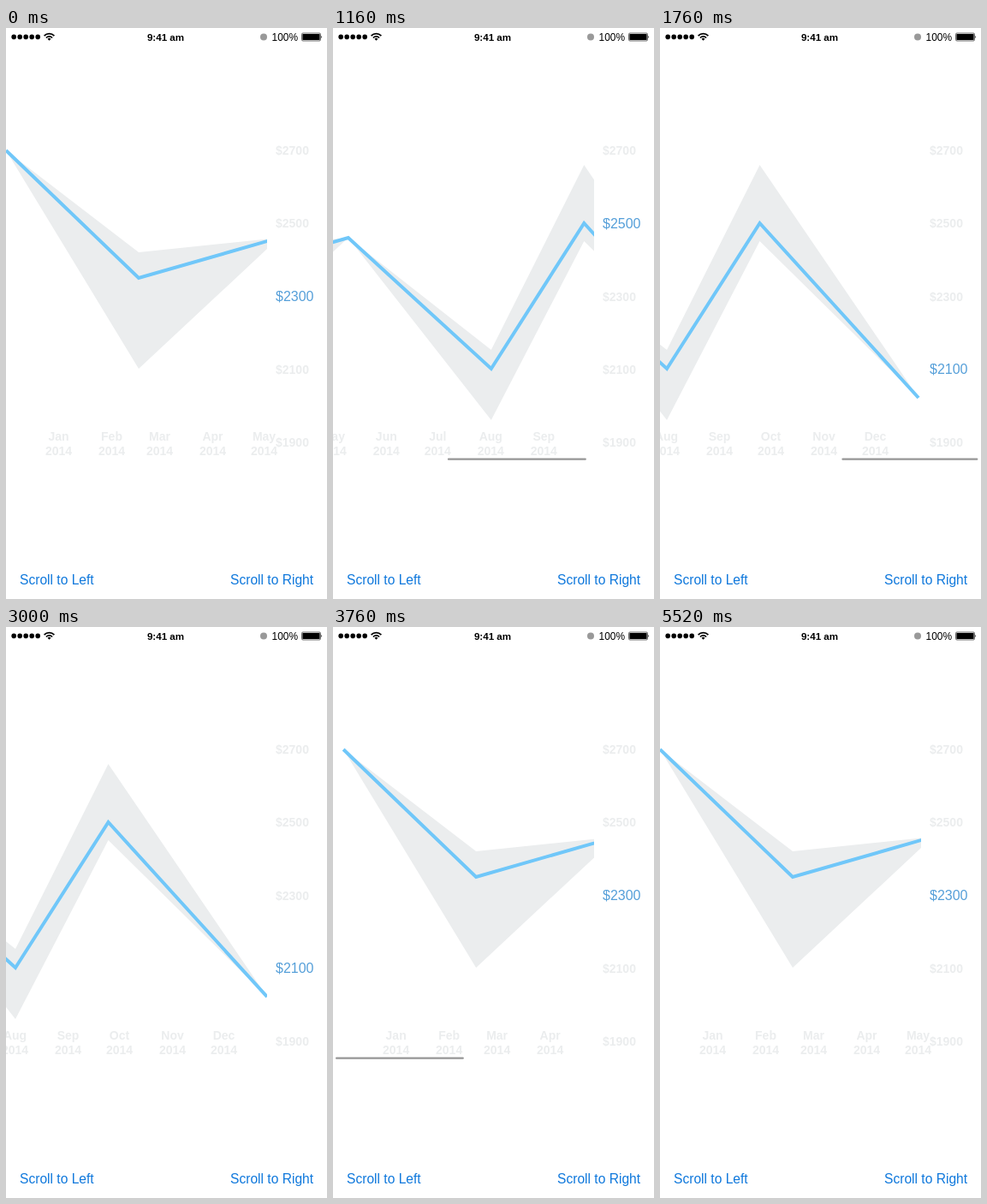
An HTML page for the animation above (5560 ms loop, 375 by 667 pixels).

```html
<!DOCTYPE html>
<html lang="en">
<head>
<meta charset="utf-8">
<title>Scrolling chart</title>
<style>
  html, body { margin: 0; width: 100%; height: 100%; overflow: hidden; background: #fff; }
  svg { display: block; width: 375px; height: 667px; font-family: "Liberation Sans", Arial, sans-serif; }
  .pale { font-size: 14px; font-weight: bold; fill: #ebedee; }
  .active { font-size: 16px; font-weight: normal; fill: #559fd9; }
  .link { font-size: 15.6px; fill: #0f78dc; }
  .middle { text-anchor: middle; }
</style>
</head>
<body>
<svg viewBox="0 0 375 667">
  <clipPath id="plot"><rect width="305" height="667"/></clipPath>

  <g id="dots"></g>
  <g fill="none" stroke="#000" stroke-width="1.7">
    <path d="M44.6 9.2a8.2 8.2 0 0 1 11.8 0M46.9 11.5a5 5 0 0 1 7.2 0"/>
    <path d="M50.5 14.8l-2-2.1a2.9 2.9 0 0 1 4 0z" fill="#000" stroke="none"/>
  </g>
  <text class="middle" x="186.5" y="14.5" font-size="11.6" font-weight="bold">9:41 am</text>
  <circle cx="301" cy="10.4" r="4" fill="#999"/>
  <text x="310.6" y="14.5" font-size="11.9">100%</text>
  <rect x="345.5" y="6" width="22" height="9" rx="1.4" fill="none" stroke="#000" stroke-width=".6"/>
  <rect x="346.4" y="6.9" width="20.2" height="7.2" rx=".6"/>
  <path d="M368.4 8.9q1.6 1.6 0 3.2z"/>

  <g id="prices"></g>
  <g clip-path="url(#plot)">
    <g class="scroll">
      <polygon id="band" fill="#ebedee"/>
      <polyline id="line" fill="none" stroke="#70c7f9" stroke-width="4"/>
    </g>
  </g>
  <g class="scroll" id="months"></g>
  <rect id="bar" y="502.6" height="2.2" rx="1.1" fill="#969696"/>

  <text class="link" x="16" y="650">Scroll to Left</text>
  <text class="link" x="262" y="650">Scroll to Right</text>
</svg>
<script>
const LOOP = 5560, VIEW = 305, MAX = 475;
const RIGHT_AT = 907, LEFT_AT = 3077;   // flick start times, ms
const SETTLE = 1000, FADE = 260;

const $ = id => document.getElementById(id);
function add(parent, tag, attrs, text = '') {
  const el = document.createElementNS('http://www.w3.org/2000/svg', tag);
  for (const key in attrs) el.setAttribute(key, attrs[key]);
  el.textContent = text;
  return parent.appendChild(el);
}

// x, value, upper bound, lower bound
const points = [
  [0, 143, 143, 143], [155, 292, 262, 398], [319, 245, 245, 245],
  [486, 398, 376, 458], [594.5, 228, 160, 249], [780, 432, 432, 432]
];
const path = col => points.map(p => [p[0], p[col]]);
$('line').setAttribute('points', path(1).join(' '));
$('band').setAttribute('points', [...path(2), ...path(3).reverse()].join(' '));

for (let i = 0; i < 5; i++) add($('dots'), 'circle', { cx: 9.2 + 7 * i, cy: 10.4, r: 2.8 });

const prices = [2700, 2500, 2300, 2100, 1900].map((price, i) => {
  const y = 143 + 85.25 * i;
  return { y, el: add($('prices'), 'text', { x: 315, y: y + 5 }, '$' + price) };
});

// Two pixels per day
const months = 'Jan Feb Mar Apr May Jun Jul Aug Sep Oct Nov Dec'.split(' ').map((name, i) => {
  const x = 61.5 + 2 * (Date.UTC(2014, i, 1) - Date.UTC(2014, 0, 1)) / 864e5;
  const el = add($('months'), 'g', { class: 'pale middle' });
  add(el, 'text', { x, y: 482 }, name);
  add(el, 'text', { x, y: 499 }, '2014');
  return { x, el };
});

// Distance after u ms: finger ramp, decaying glide, then a damped bounce past the edge
function flick(u) {
  const v = 1.65, ramp = 100, decay = 500, omega = 0.0112;
  if (u <= 0) return 0;
  if (u < ramp) return v * u * u / (2 * ramp);
  const start = v * ramp / 2, reach = v * decay;
  const left = 1 - (MAX - start) / reach;
  const hit = ramp - decay * Math.log(left);
  if (u < hit) return start + reach * (1 - Math.exp((ramp - u) / decay));
  const w = u - hit;
  return MAX + v * left * w * Math.exp(-omega * w);
}

function draw(now) {
  const t = now % LOOP;
  const goingLeft = t >= LEFT_AT;
  const u = t - (goingLeft ? LEFT_AT : RIGHT_AT);
  const dist = flick(u);
  const s = goingLeft ? MAX - dist : dist;

  for (const g of document.querySelectorAll('.scroll'))
    g.setAttribute('transform', `translate(${-s} 0)`);
  for (const { x, el } of months)
    el.setAttribute('visibility', x - s >= 0 && x - s <= VIEW ? 'visible' : 'hidden');

  // The price nearest the last visible point is highlighted
  const lastY = points.filter(p => p[0] <= s + VIEW + 0.5).pop()[1];
  const gap = p => Math.abs(p.y - lastY);
  const best = prices.reduce((a, b) => gap(b) < gap(a) ? b : a);
  for (const p of prices) {
    p.el.setAttribute('class', p === best ? 'active' : 'pale');
    p.el.setAttribute('y', p.y + (p === best ? 5.7 : 5));
  }

  const inside = Math.max(0, Math.min(MAX, s));
  const over = s - inside;
  const bar = $('bar');
  bar.setAttribute('x', 3 + inside * 0.4345 + Math.max(0, over));
  bar.setAttribute('width', 162 - Math.abs(over));
  bar.setAttribute('opacity', u <= 0 ? 0 : Math.max(0, Math.min(1, 1 - (u - SETTLE) / FADE)));
}

const begin = performance.now();
function tick() {
  draw(performance.now() - begin);
  requestAnimationFrame(tick);
}
tick();
</script>
</body>
</html>
```
